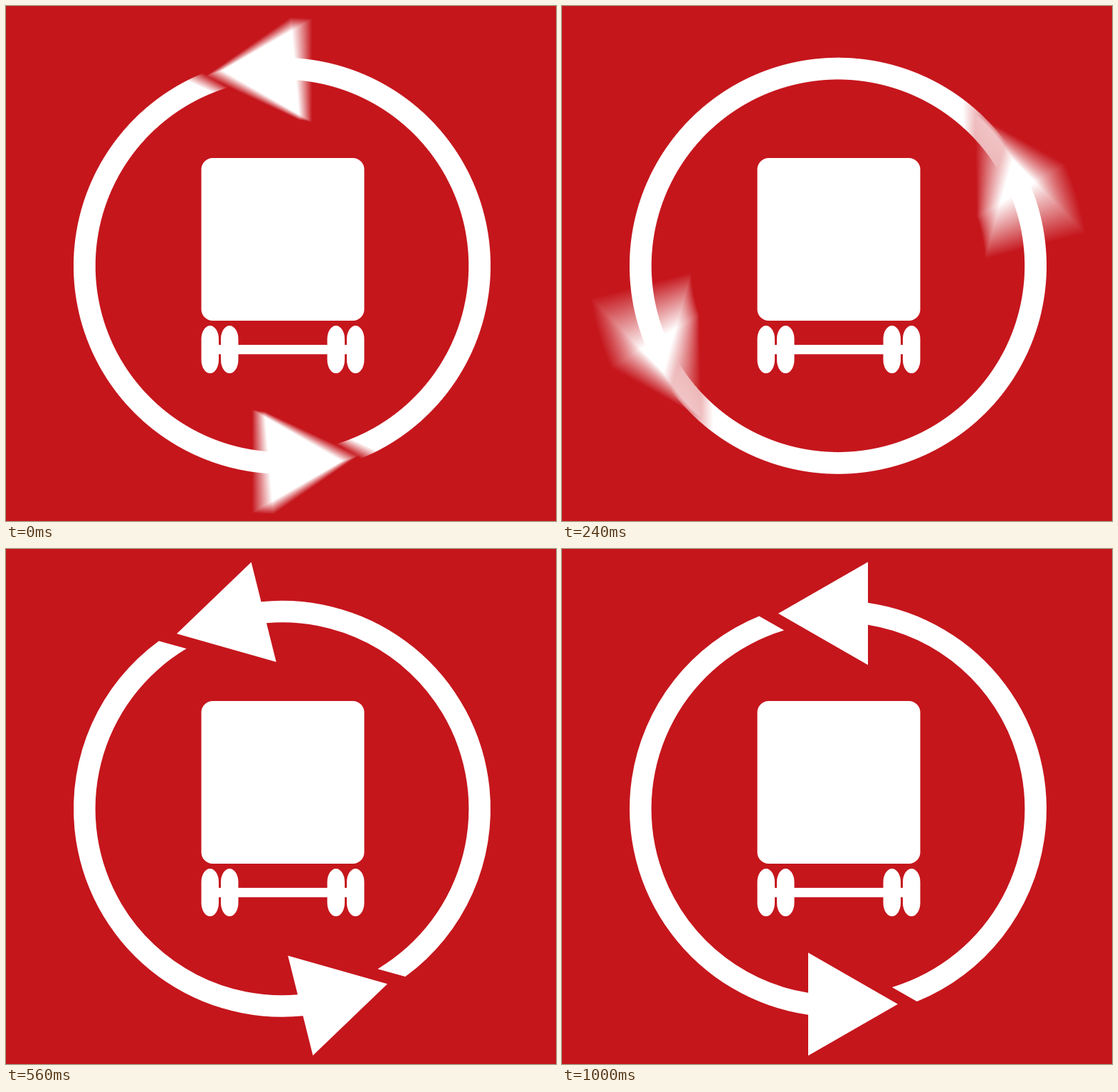
These frames come from a looping animation (773x725 px, 1540 ms). An HTML page with a canvas:

```html
<!DOCTYPE html>
<html lang="en">
<head>
<meta charset="utf-8">
<title>Truck turn</title>
<style>
  html, body { margin: 0; width: 100%; height: 100%; overflow: hidden; background: #c5161c; }
  canvas { display: block; }
</style>
</head>
<body>
<canvas id="stage" width="773" height="725"></canvas>
<script>
const ctx = document.getElementById('stage').getContext('2d');
const LOOP = 1540, STEP = 40, LAST_STEP = 25, SHUTTER = 0.5;
const CENTER = { x: 388, y: 365.75 };
const OUTER = 293, INNER = 262.4;

// [step, counter-clockwise angle in degrees, degrees per step]
const KEYS = [
  [0, 0, 9.6],
  [4.25, 59.7, 19],
  [6.25, 112.9, 34.6],
  [10.25, 186.3, 4.2],
  [14, 194, 0],
  [25, 180, -28 / 11]
];

// Cubic Hermite interpolation between the keys
function angleAt(step) {
  if (step >= LAST_STEP) return 180;
  const i = KEYS.findIndex(key => key[0] > step);
  const [t0, a0, v0] = KEYS[i - 1], [t1, a1, v1] = KEYS[i];
  const h = t1 - t0, u = (step - t0) / h, w = 1 - u;
  return a0 * w * w * (1 + 2 * u) + a1 * u * u * (3 - 2 * u)
    + h * u * w * (v0 * w - v1 * u);
}

// One half of the ring with its arrowhead, around the origin
function makeArrow() {
  const back = 42, path = new Path2D();
  path.moveTo(-84, -275);
  path.lineTo(back, -347.5);
  path.arc(0, 0, OUTER, -Math.acos(back / OUTER), Math.atan2(271, 110.8));
  path.arc(0, 0, INNER, Math.atan2(251, 75.8), -Math.acos(back / INNER), true);
  path.lineTo(back, -202.5);
  path.closePath();
  return path;
}

function makeTruck() {
  const path = new Path2D();
  path.roundRect(274.5, 214, 229, 229, 16);
  for (const x of [274.5, 302, 451.5, 479]) {
    path.roundRect(x, 450, 24.5, 67, { x: 12.25, y: 19 });
  }
  path.rect(287, 477, 204, 13.3);
  return path;
}

const arrow = makeArrow(), truck = makeTruck();

function drawArrows(degrees) {
  for (const turn of [0, 180]) {
    ctx.save();
    ctx.translate(CENTER.x, CENTER.y);
    ctx.rotate(-(degrees + turn) * Math.PI / 180);
    ctx.fill(arrow);
    ctx.restore();
  }
}

function draw(step) {
  ctx.clearRect(0, 0, 773, 725);
  ctx.fillStyle = '#fff';
  ctx.fill(truck);

  // Motion blur: sum equally weighted poses; the counts divide 255 evenly
  const sweep = Math.abs(angleAt(step + SHUTTER) - angleAt(step));
  const samples = sweep < 0.1 ? 1 : sweep < 1.5 ? 15 : 51;
  ctx.save();
  ctx.globalCompositeOperation = 'lighter';
  ctx.globalAlpha = 1 / samples;
  for (let i = 0; i < samples; i++) {
    drawArrows(angleAt(step + SHUTTER * i / samples));
  }
  ctx.restore();
}

let shown = -1;
const start = performance.now();

function tick() {
  const time = (performance.now() - start) % LOOP;
  const step = Math.min(LAST_STEP, Math.floor(time / STEP));
  if (step !== shown) draw(shown = step);
  requestAnimationFrame(tick);
}
tick();
</script>
</body>
</html>
```
